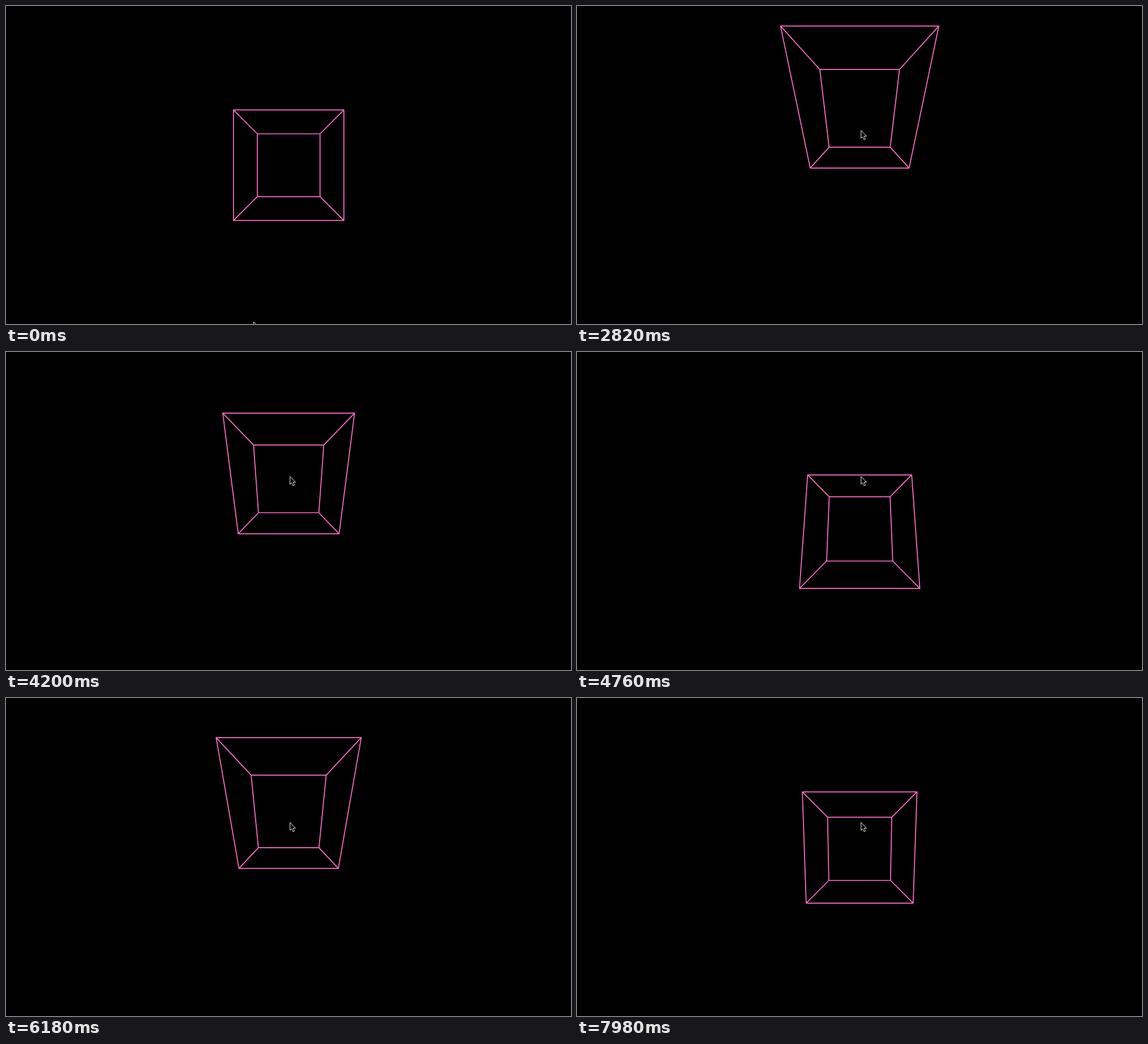
An HTML page with a canvas for the animation above (8 s loop, 998 by 561 pixels).

```html
<!DOCTYPE html>
<html lang="en">
<head>
<meta charset="utf-8">
<title>Wireframe cube</title>
<style>
  html, body { margin: 0; height: 100%; overflow: hidden; background: #000; }
  canvas { display: block; }
</style>
</head>
<body>
<canvas id="stage" width="998" height="561"></canvas>
<script>
const ctx = document.getElementById('stage').getContext('2d');
const LOOP = 8000, CX = 499.3, CY = 280.9;
const FOCAL = 196.4, NEAR = 2.0144, FAR = 3.545;

// One camera swing per period, each ending at the next angle in degrees
const ANGLES = [24.95, -8.35, 20.65, 4];
const FIRST = 2500, PERIOD = 1600, SWING = 320;

const ARROW = new Path2D('M0 0V13.5L3 10.8 5.3 16 7.8 15 5.5 9.8H9.3Z');

const progress = (t, from, to) => Math.min(1, Math.max(0, (t - from) / (to - from)));
const mix = (a, b, u) => a + (b - a) * u;
const smooth = u => u * u * (3 - 2 * u);
const overshoot = u => u * u * (4 - 3 * u);

function pitch(t) {
  return ANGLES.reduce((angle, next, i) => {
    const from = FIRST + i * PERIOD;
    return mix(angle, next, overshoot(progress(t, from, from + SWING)));
  }, 0) * Math.PI / 180;
}

// Up from the bottom edge, then across onto the cube
function pointer(t) {
  const rise = smooth(progress(t, 20, 800)), cross = smooth(progress(t, 840, 980));
  return [mix(mix(437.5, 431, rise), 501.7, cross), mix(mix(557.5, 213.5, rise), 219.9, cross)];
}

// The camera pitches about its own position
function project(x, y, z, angle) {
  const c = Math.cos(angle), s = Math.sin(angle);
  const scale = FOCAL / (z * c + y * s);
  return [CX + x * scale, CY + (y * c - z * s) * scale];
}

function drawCube(angle) {
  const corners = [[-1, -1], [1, -1], [1, 1], [-1, 1]];
  const face = z => corners.map(([x, y]) => project(x, y, z, angle));
  const front = face(NEAR), back = face(FAR);
  ctx.beginPath();
  for (let i = 0; i < 4; i++) {
    const next = (i + 1) % 4;
    for (const [a, b] of [[front[i], front[next]], [back[i], back[next]], [front[i], back[i]]]) {
      ctx.moveTo(...a);
      ctx.lineTo(...b);
    }
  }
  ctx.strokeStyle = '#ff70c8';
  ctx.lineWidth = 1.7;
  ctx.lineCap = 'round';
  ctx.stroke();
}

function drawPointer([x, y]) {
  ctx.save();
  ctx.translate(x, y);
  ctx.fillStyle = '#000';
  ctx.fill(ARROW);
  ctx.strokeStyle = '#e8e8e8';
  ctx.lineWidth = 1;
  ctx.stroke(ARROW);
  ctx.restore();
}

function draw(t) {
  ctx.fillStyle = '#000';
  ctx.fillRect(0, 0, 998, 561);
  drawCube(pitch(t));
  drawPointer(pointer(t));
}

let start;
function tick(now) {
  start ??= now;
  draw((now - start) % LOOP);
  requestAnimationFrame(tick);
}
requestAnimationFrame(tick);
</script>
</body>
</html>
```
